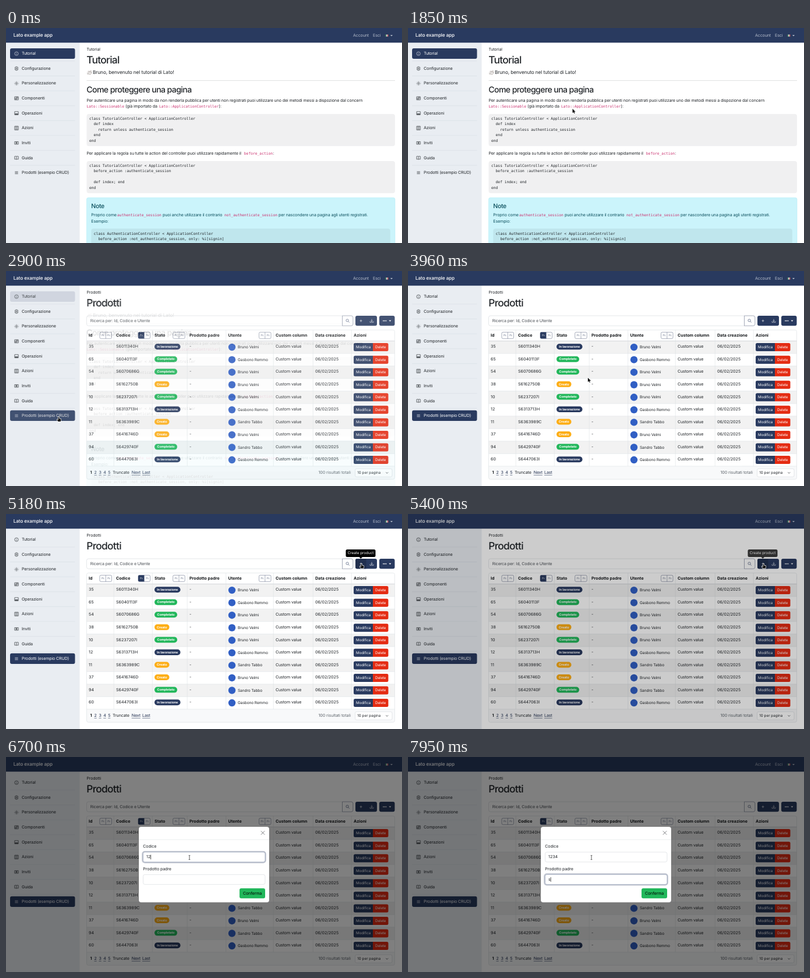
Write an HTML page with a canvas that moves like this. It is 680x370 px and loops after 8000 ms.

```html
<!DOCTYPE html>
<html lang="it">
<head>
<meta charset="utf-8">
<title>Prodotti</title>
<style>
html, body { margin: 0; width: 680px; height: 370px; overflow: hidden; background: #fff; }
canvas { display: block; width: 680px; height: 370px; }
</style>
</head>
<body>
<canvas id="stage"></canvas>
<script>
const W = 680, H = 370, LOOP = 8000;
const NAVY = '#293a5f', INK = '#212529', PINK = '#c92f6d', GREEN = '#22b75b', RED = '#e42b12', AMBER = '#fdae16';
const SANS = 'Inter, "Noto Sans", sans-serif';
const MONO = '"DejaVu Sans Mono", "Liberation Mono", monospace';
const dpr = window.devicePixelRatio || 1;
let c;

function setup(canvas) {
  canvas.width = W * dpr;
  canvas.height = H * dpr;
  const ctx = canvas.getContext('2d');
  ctx.scale(dpr, dpr);
  ctx.textRendering = 'geometricPrecision';
  ctx.textBaseline = 'middle';
  return ctx;
}

// ---------- drawing helpers ----------
function text(s, x, y, { size = 7.1, weight = 400, color = INK, track = -0.018, align = 'left', font = SANS } = {}) {
  c.font = `${weight} ${size}px ${font}`;
  c.letterSpacing = track * size + 'px';
  c.textAlign = align;
  c.fillStyle = color;
  c.fillText(s, x, y);
}
const bold = (s, x, y) => text(s, x, y, { weight: 700, track: 0, color: '#14171a' });
const heading = (s, x, y, size) => text(s, x, y, { size, weight: 500, track: -0.043 });
const mono = (s, x, y, color = INK) => text(s, x, y, { size: 6.3, font: MONO, track: 0, color });

function box(x, y, w, h, r, fill, stroke, lw = 0.6) {
  c.beginPath();
  c.roundRect(x, y, w, h, r);
  if (fill) { c.fillStyle = fill; c.fill(); }
  if (stroke) { c.strokeStyle = stroke; c.lineWidth = lw; c.stroke(); }
}

function line(x1, y1, x2, y2, color, lw = 0.6) {
  c.strokeStyle = color;
  c.lineWidth = lw;
  c.beginPath();
  c.moveTo(x1, y1);
  c.lineTo(x2, y2);
  c.stroke();
}

function dot(x, y, r, color) {
  c.fillStyle = color;
  c.beginPath();
  c.arc(x, y, r, 0, 7);
  c.fill();
}

// Icons live on a 16 unit grid centred on x, y.
const ICONS = {
  info: 'M15 8A7 7 0 1 1 1 8A7 7 0 1 1 15 8M8 7V12M8 4V5.3',
  gear: 'M10.5 8A2.5 2.5 0 1 1 5.5 8A2.5 2.5 0 1 1 10.5 8M6.5 1H9.5L10.3 3L12.5 2.3L14 5L13 7V9L14 11L12.5 13.7L10.3 13L9.5 15H6.5L5.7 13L3.5 13.7L2 11L3 9V7L2 5L3.5 2.3L5.7 3Z',
  sun: 'M11 8A3 3 0 1 1 5 8A3 3 0 1 1 11 8M8 0V2.5M8 13.5V16M0 8H2.5M13.5 8H16M2.5 2.5L4 4M12 12L13.5 13.5M2.5 13.5L4 12M12 4L13.5 2.5',
  grid: 'M1 2H15V14H1ZM1 8H15M8 2V14M9.5 4H13.5M2.5 11H6.5',
  tray: 'M1 2H15V14H1ZM2 10H14M2 11.5H14M2 13H14',
  columns: 'M1 1H15V15H1ZM5.7 1V15M10.3 1V15',
  mail: 'M1 3H15V13H1ZM5 6H11M5 8H11M5 10H11M8 5V11',
  book: 'M1 2.5Q5 1 8 3Q11 1 15 2.5V13.5Q11 12 8 14Q5 12 1 13.5ZM8 3V14',
  list: 'M2 4H14M2 8H14M2 12H14',
  search: 'M11.5 6.5A5 5 0 1 1 1.5 6.5A5 5 0 1 1 11.5 6.5M10 10L15 15',
  plus: 'M8 3V13M3 8H13',
  download: 'M1 10V14H15V10M8 1V11M4.5 7.5L8 11L11.5 7.5',
  down: 'M3 5.5L8 10.5L13 5.5',
  close: 'M1 1L15 15M15 1L1 15',
  sort: 'M1 3H10M1 7H8M1 11H5M13 3V12M11 10L13 12L15 10',
  wave: 'M3 4L9 10M5.5 2.5L11 8M9 2.5L13 7Q14 3 15 6Q16 13 11 14.5Q7 15 1.5 7.5M1 11Q2 14 5 15M12 1Q14 1 15 3'
};
function icon(name, x, y, color = INK, k = 0.45, lw = 1.4) {
  c.save();
  c.translate(x - 8 * k, y - 8 * k);
  c.scale(k, k);
  c.strokeStyle = color;
  c.lineWidth = lw;
  c.stroke(new Path2D(ICONS[name]));
  c.restore();
}

function caretDown(x, y, color) {
  c.fillStyle = color;
  c.beginPath();
  c.moveTo(x - 2, y - 1);
  c.lineTo(x + 2, y - 1);
  c.lineTo(x, y + 1.3);
  c.fill();
}

// ---------- pages ----------
const MENU = [
  ['info', 'Tutorial'], ['gear', 'Configurazione'], ['sun', 'Personalizzazione'],
  ['grid', 'Componenti'], ['tray', 'Operazioni'], ['columns', 'Azioni'],
  ['mail', 'Inviti'], ['book', 'Guida'], ['list', 'Prodotti (esempio CRUD)']
];

function frame(active) {
  box(0, 0, W, H, 0, '#fff');
  box(0, 25, 126.5, H, 0, '#e9edf2');
  box(0, 0, W, 25.3, 0, NAVY);
  text('Lato example app', 12.8, 13, { size: 8.2, weight: 500, color: '#fff', track: -0.015 });
  text('Account', 596, 13, { color: '#b4bccb' });
  text('Esci', 630, 13, { color: '#b4bccb' });
  ['#4f8a63', '#e8e8e8', '#b9565c'].forEach((f, i) => box(651.5 + i * 1.7, 11.2, 1.7, 3.6, 0, f));
  caretDown(662, 13, '#b4bccb');
  MENU.forEach(([ic, label], i) => {
    const y = 44.1 + i * 25.62, on = i === active;
    if (on) box(7, y - 9.2, 111.5, 18.2, 3, NAVY);
    if (i < MENU.length - 1) line(7, y + 12.8, 118.5, y + 12.8, '#d9dee5', 0.7);
    icon(ic, 18, y, on ? '#e4e8ef' : INK);
    text(label, 27, y, { color: on ? '#fff' : INK });
  });
}

function codeBlock(y, rows) {
  box(138.5, y, 529.5, 55.3, 4, '#f0f0f1');
  rows.forEach((s, i) => mono(s, 143, y + 8.4 + i * 9.45));
}

function tutorialPage() {
  frame(0);
  text('Tutorial', 138.5, 37, { size: 6.9 });
  heading('Tutorial', 138.3, 56, 17.4);
  icon('wave', 143, 76.5, '#8d817b', 0.5, 1.5);
  text('Bruno, benvenuto nel tutorial di Lato!', 149, 76.5, { size: 8.3, track: -0.0146 });
  line(138.5, 90.5, 668, 90.5, '#d3d4d5', 0.7);
  heading('Come proteggere una pagina', 138.3, 106.7, 14.1);
  text('Per autenticare una pagina in modo da non renderla pubblica per utenti non registrati puoi utilizzare uno dei metodi messi a dispozione dal concern', 138.5, 124.6);
  mono('Lato::Sessionable', 138.5, 135, PINK);
  text('(già importato da', 205, 135);
  mono('Lato::ApplicationController', 263, 135, PINK);
  text('):', 365.5, 135);
  codeBlock(148, ['class TutorialController < ApplicationController', '  def index', '    return unless authenticate_session', '  end', 'end']);
  text('Per applicare la regola su tutte le action del controller puoi utilizzare rapidamente il', 138.5, 216.3);
  mono('before_action', 408.8, 216.3, PINK);
  text(':', 458.3, 216.3);
  codeBlock(229, ['class TutorialController < ApplicationController', '  before_action :authenticate_session', '', '  def index; end', 'end']);

  const teal = '#0b4f5d';
  box(138.5, 292, 529.5, 120, 3, '#cbf4fb', '#b3ecf6');
  text('Note', 146.3, 306.7, { size: 10.5, weight: 500, color: teal, track: -0.03 });
  text('Proprio come', 146.3, 322, { color: teal });
  mono('authenticate_session', 191, 322, PINK);
  text('puoi anche utilizzare il contrario', 269, 322, { color: teal });
  mono('not_authenticate_session', 375, 322, PINK);
  text('per nascondere una pagina agli utenti registrati.', 468, 322, { color: teal });
  text('Esempio:', 146.3, 332.7, { color: teal });
  box(146.3, 345.3, 513.5, 60, 4, '#bfe6ed');
  mono('class AuthenticationController < ApplicationController', 150.8, 354);
  mono('  before_action :not_authenticate_session, only: %i[signin]', 150.8, 363.4);
}

const STATES = { L: ['In lavorazione', NAVY, 44.5], C: ['Completato', GREEN, 39], N: ['Creato', AMBER, 25.5] };
const USERS = { B: 'Bruno Velmi', G: 'Gasbono Remmo', S: 'Sandro Tabbo' };
const ROWS = [
  '35 S6011340H L B', '65 S6040113F C G', '54 S6070686G C B', '38 S6162750B N B', '10 S6237207I C B',
  '12 S6313713H L G', '11 S6363989C N S', '37 S6416746D N B', '94 S6429740F C S', '60 S6447063I L G'
];
const COLS = [
  ['Id', 142, 161], ['Codice', 189, 227], ['Stato', 255, 286.7], ['Prodotto padre', 315], ['Utente', 381.5, 434.5],
  ['Custom column', 463], ['Data creazione', 531], ['Azioni', 597]
];

function sorter(x, on) {
  box(x, 105.3, 20.5, 11, 2, '#fff', '#6d788f');
  if (on) box(x, 105.3, 10.3, 11, [2, 0, 0, 2], NAVY);
  line(x + 10.3, 105.3, x + 10.3, 116.3, '#6d788f');
  icon('sort', x + 5.2, 110.8, on ? '#fff' : '#4d5a76', 0.3);
  icon('sort', x + 15.4, 110.8, '#4d5a76', 0.3);
}

function tableRow(row, i) {
  const [id, code, state, user] = row.split(' ');
  const y = 130.2 + i * 21.55, top = 120.4 + i * 21.55;
  if (i % 2 === 0) box(138.5, top, 529, 21.55, 0, '#f2f2f2');
  line(138.5, top, 667.5, top, i ? '#dee2e6' : '#b9bec4');
  text(id, 142, y, { track: 0 });
  text(code, 189, y, { track: 0 });
  const [label, fill, w] = STATES[state];
  box(255, y - 5, w, 10, 5, fill);
  text(label, 255 + w / 2, y + 0.1, { size: 5.4, weight: 700, color: '#fff', align: 'center', track: -0.01 });
  text('-', 315, y);
  dot(388, y + 0.9, 6.2, '#315fc4');
  text(USERS[user], 398, y + 1, { size: 6.6 });
  text('Custom value', 463, y);
  text('06/02/2025', 531, y, { track: 0 });
  box(597, y - 6.1, 33, 14, [2.5, 0, 0, 2.5], NAVY);
  box(630, y - 6.1, 26.5, 14, [0, 2.5, 2.5, 0], RED);
  text('Modifica', 613.6, y + 1, { size: 6.3, color: '#fff', align: 'center' });
  text('Delete', 643.2, y + 1, { size: 6.3, color: '#fff', align: 'center' });
}

function productsPage() {
  frame(8);
  text('Prodotti', 138.5, 37, { size: 6.9 });
  heading('Prodotti', 138.3, 55.7, 17.4);

  box(138.5, 77, 439, 17.3, [3, 0, 0, 3], '#fff', '#d3d7dc');
  text('Ricerca per: Id, Codice e Utente', 144.7, 85.7, { color: '#4a4f55' });
  box(577.5, 77, 18.3, 17.3, [0, 3, 3, 0], '#fff', '#6d788f');
  icon('search', 586.7, 85.7, NAVY, 0.43);
  box(600, 77, 37, 17.3, 3, NAVY);
  icon('plus', 609.5, 85.7, '#fff', 0.42);
  icon('download', 628, 85.7, '#fff', 0.43);
  box(641, 77, 26.5, 17.3, 3, NAVY);
  [648, 650.3, 652.6].forEach(x => dot(x, 85.7, 0.85, '#fff'));
  caretDown(659.5, 85.7, '#fff');

  COLS.forEach(([name, x, sx], i) => {
    bold(name, x, 111);
    if (sx) sorter(sx, i === 1);
  });
  ROWS.forEach(tableRow);
  box(138.5, 335.9, 529, 22.5, [0, 0, 3, 3], '#f8f9fa');
  line(138.5, 335.9, 667.5, 335.9, '#dee2e6');
  COLS.slice(1).forEach(([, x]) => line(x - 3.8, 101.5, x - 3.8, 335.9, '#dee2e6'));
  box(138.5, 101.5, 529, 256.9, 3, null, '#d9dde1');

  bold('1', 144.5, 347.3);
  const link = (s, x) => {
    text(s, x, 347.3, { color: '#1e2c4d' });
    line(x, 351.3, x + c.measureText(s).width, 351.3, '#1e2c4d', 0.55);
  };
  ['2', '3', '4', '5'].forEach((s, i) => link(s, 151.5 + i * 7.9));
  text('Truncate', 183, 347.3);
  link('Next', 215.7);
  link('Last', 234);
  text('100 risultati totali', 536.5, 347.3, { color: '#5d646b', track: -0.01 });
  box(599.5, 340.3, 63.5, 14, 2.5, '#fff', '#d3d7dc');
  text('10 per pagina', 603.3, 347.3, { size: 6.3, track: 0 });
  icon('down', 654.3, 347.3, INK, 0.38, 1.8);
}

function render(page) {
  const canvas = document.createElement('canvas');
  c = setup(canvas);
  page();
  return canvas;
}

// ---------- motion ----------
const clamp = v => Math.max(0, Math.min(1, v));
const ramp = (t, from, span) => clamp((t - from) / span);
const smooth = p => p * p * (3 - 2 * p);
const easeOut = p => 1 - Math.pow(1 - p, 1.9);

// Pointer path: time, x, y
const PATH = [
  [460, 300, 376], [630, 297, 250], [1430, 297, 250], [1670, 282.5, 139], [1850, 282.5, 139],
  [2600, 90.5, 251], [3600, 90.5, 251], [4400, 604, 93], [4500, 604, 93], [4740, 610.5, 85.5],
  [5560, 610.5, 85.5], [5670, 548.5, 93.5], [5970, 325, 170], [6060, 325, 170], [6250, 315, 173]
];
function pointer(t) {
  const n = PATH.findIndex(k => k[0] > t);
  if (n === 0) return [300, 400];
  if (n < 0) return PATH[PATH.length - 1].slice(1);
  const [t0, x0, y0] = PATH[n - 1], [t1, x1, y1] = PATH[n];
  const p = smooth((t - t0) / (t1 - t0));
  return [x0 + (x1 - x0) * p, y0 + (y1 - y0) * p];
}

const ARROW = new Path2D('M0 0V7.2L1.7 5.7L2.9 8.3L4 7.8L2.9 5.3H5.2Z');
const HAND = new Path2D('M-0.8 0.4Q0 -0.5 0.8 0.4V3L3.6 3.7Q4.2 4 4 5.2L3.2 8H-1L-3 5Q-3 4 -2 4.4L-0.8 5.4Z');
function drawPointer(t, x, y) {
  const modal = t > 5560;
  c.save();
  c.translate(x, y);
  if (modal && x < 445 && y > 163) {
    line(0, -3.5, 0, 3.5, '#333', 0.8);
    line(-1.4, -3.6, 1.4, -3.6, '#333', 0.7);
    line(-1.4, 3.6, 1.4, 3.6, '#333', 0.7);
  } else {
    const link = !modal && (x < 118 || (x > 600 && y < 94.3));
    const shape = link ? HAND : ARROW;
    c.strokeStyle = '#fff';
    c.lineWidth = 1.3;
    c.stroke(shape);
    c.fillStyle = '#111';
    c.fill(shape);
  }
  c.restore();
}

function tooltip(alpha) {
  if (!alpha) return;
  c.globalAlpha = alpha;
  box(583.5, 61, 51, 13, 2.5, '#000');
  c.beginPath();
  c.moveTo(606.5, 74);
  c.lineTo(612, 74);
  c.lineTo(609.2, 76.8);
  c.fill();
  text('Create product', 609, 67.5, { size: 6.3, color: '#fff', align: 'center', track: 0 });
  c.globalAlpha = 1;
}

function field(label, y, value, focus) {
  text(label, 235.3, y - 18.2);
  if (focus) box(235.3 - 1, y - 9.5, 211.4, 19, 4, null, `rgba(41,58,95,${0.3 * focus})`, 2);
  box(235.5, y - 8.5, 209.4, 17, 3, '#fff', focus > 0.5 ? '#8490ab' : '#d3d7dc');
  text(value, 241, y, { track: 0 });
  if (focus > 0.5) {
    const x = 241.4 + c.measureText(value).width;
    line(x, y - 4, x, y + 4, '#111', 0.7);
  }
}

function modal(t) {
  const alpha = ramp(t, 5500, 150);
  if (!alpha) return;
  c.save();
  c.globalAlpha = alpha;
  c.translate(0, -24 * (1 - easeOut(ramp(t, 5500, 300))));
  box(228, 120, 224, 130.3, 4, '#fff', 'rgba(0,0,0,.2)');
  line(228, 142.2, 452, 142.2, '#dee2e6');
  icon('close', 441, 130.5, '#5a5d60', 0.46, 1.7);
  const typed = [6550, 6700, 6940, 7190].filter(k => t >= k).length;
  field('Codice', 172.2, '1234'.slice(0, typed), ramp(t, 6230, 150) - ramp(t, 7490, 150));
  field('Prodotto padre', 210.8, t >= 7950 ? 's' : '', ramp(t, 7490, 150));
  box(401, 226, 44, 17.3, 3, GREEN);
  text('Conferma', 423, 234.7, { color: '#000', align: 'center' });
  c.restore();
}

const tutorial = render(tutorialPage);
const products = render(productsPage);
const stage = setup(document.getElementById('stage'));

const hold = t => t >= 5400 && t < 5500 ? 5400 : t >= 5670 && t < 5760 ? 5670 : t;

function draw(now) {
  const t = hold(now % LOOP);
  c = stage;
  c.globalAlpha = 1;
  const mix = t < 2720 ? 0 : t < 2810 ? 0.25 : t < 2900 ? 0.6 : t < 3040 ? 0.87 : 1;
  if (mix < 1) c.drawImage(tutorial, 0, 0, W, H);
  if (mix > 0) {
    c.globalAlpha = mix;
    c.drawImage(products, 0, 0, W, H);
    c.globalAlpha = 1;
  }
  const [x, y] = pointer(t);
  if (t > 4600 && t < 5600) {
    box(600, 77, 18.5, 17.3, [3, 0, 0, 3], '#212f4e');
    icon('plus', 609.5, 85.7, '#fff', 0.42);
  }
  const dim = 0.5 * ramp(t, 5340, 150);
  if (dim) box(0, 0, W, H, 0, `rgba(0,0,0,${dim})`);
  tooltip(ramp(t, 4560, 150) * (1 - ramp(t, 5365, 150)));
  modal(t);
  drawPointer(t, x, y);
}

let start;
function tick(now) {
  start ??= now;
  draw(now - start);
  requestAnimationFrame(tick);
}
draw(0);
requestAnimationFrame(tick);
</script>
</body>
</html>
```
